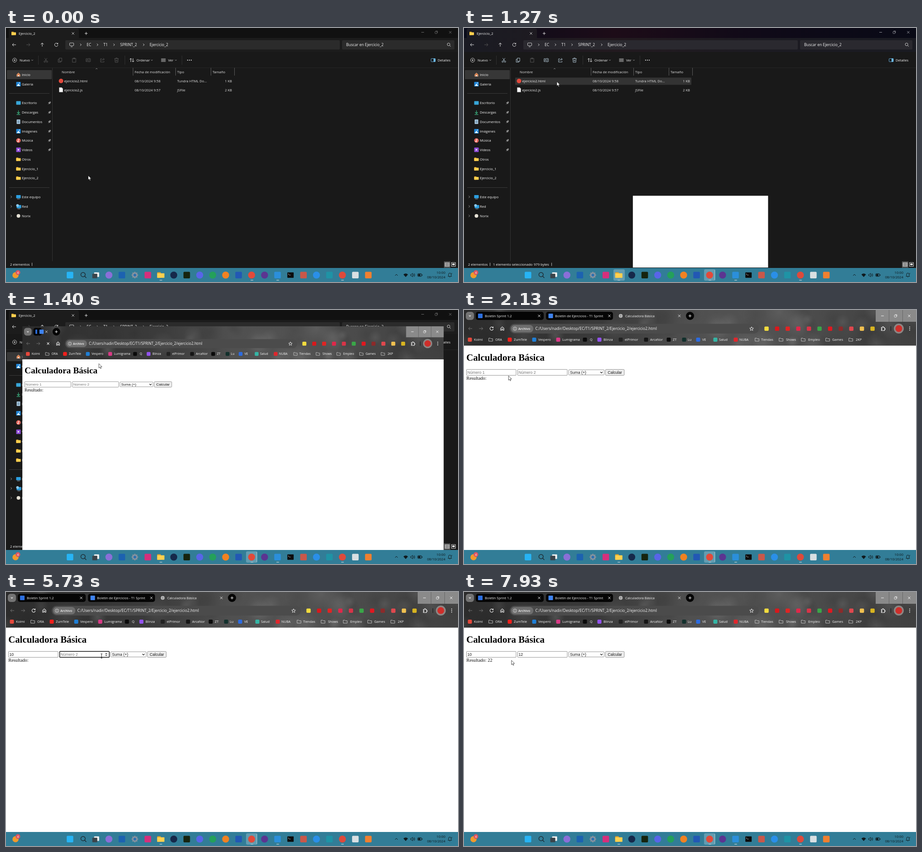
An HTML page with a canvas for the animation above (8 s loop, 998 px wide and 561 px high).

```html
<!DOCTYPE html>
<html lang="es">
<head>
<meta charset="utf-8">
<title>Calculadora Básica</title>
<style>
html, body { margin: 0; width: 100%; height: 100%; overflow: hidden; background: #191919; }
canvas { display: block; width: 998px; height: 561px; }
</style>
</head>
<body>
<canvas id="stage" width="998" height="561"></canvas>
<script>
const g = document.getElementById('stage').getContext('2d');
const UI = '"Open Sans", "Noto Sans", sans-serif';
const ARIAL = '"Liberation Sans", Arial, sans-serif';
const TIMES = '"Liberation Serif", Times, serif';
const WHITE = '#f6f6f6';

// ---- drawing helpers; y is the middle of the capitals ----
function text(s, x, y, size = 7.55, color = WHITE, font = UI, align = 'left', weight = '') {
  g.font = `${weight} ${size}px ${font}`;
  g.textAlign = align;
  g.fillStyle = color;
  g.fillText(s, x, y + size * .36);
}
function box(x, y, w, h, color, r = 0) {
  g.fillStyle = color;
  g.beginPath();
  g.roundRect(x, y, w, h, r);
  g.fill();
}
function frame(x, y, w, h, color, lw = .8, r = 0) {
  g.strokeStyle = color;
  g.lineWidth = lw;
  g.beginPath();
  g.roundRect(x, y, w, h, r);
  g.stroke();
}
function dot(x, y, r, color) { box(x - r, y - r, 2 * r, 2 * r, color, r); }
function square(x, y, s, color, r = 1) { box(x - s / 2, y - s / 2, s, s, color, r); }
function line(d, x, y, color = WHITE, lw = .9, fill) {
  g.save();
  g.translate(x, y);
  const p = new Path2D(d);
  if (fill) { g.fillStyle = fill; g.fill(p); }
  if (lw) { g.strokeStyle = color; g.lineWidth = lw; g.stroke(p); }
  g.restore();
}
function blend(gradient, colors) {
  colors.forEach((c, i) => gradient.addColorStop(i / (colors.length - 1), c));
  return gradient;
}
const across = (...colors) => blend(g.createLinearGradient(0, 0, 998, 0), colors);
const lerp = (a, b, k) => a + (b - a) * k;

const D = {
  x: 'M-2.6 -2.6L2.6 2.6M2.6 -2.6L-2.6 2.6',
  plus: 'M-3.2 0H3.2M0 -3.2V3.2',
  left: 'M4 0H-4M-.8 -3.3L-4 0L-.8 3.3',
  right: 'M-4 0H4M.8 -3.3L4 0L.8 3.3',
  up: 'M0 4V-4M-3.3 -.8L0 -4L3.3 -.8',
  reload: 'M3 -2.2A3.7 3.7 0 1 0 3.7 .6M3.5 -4.2V-1.7H1',
  gt: 'M-1.2 -2.4L1.2 0L-1.2 2.4',
  down: 'M-2 -1L0 1L2 -1',
  home: 'M-3.6 -.4L0 -3.8L3.6 -.4V3.8H1.2V1H-1.2V3.8H-3.6Z',
  lens: 'M2.2 -.8A3 3 0 1 0 -3.8 -.8A3 3 0 1 0 2.2 -.8M1.4 1.4L4 4',
  folder: 'M-4.3 3.3V-3.3H-1L.2 -2H4.3V3.3Z',
  cut: 'M-2.5 -4.5L1.6 2M2.5 -4.5L-1.6 2M-1 3.3A1.6 1.6 0 1 0 -4.2 3.3A1.6 1.6 0 1 0 -1 3.3M4.2 3.3A1.6 1.6 0 1 0 1 3.3A1.6 1.6 0 1 0 4.2 3.3',
  copy: 'M-1.5 -4.5H4V2.5H-1.5ZM-1.5 -2H-4V4.5H2V2.5',
  paste: 'M-3.8 -3.8H3.8V4.6H-3.8ZM-1.5 -4.8H1.5V-2.8H-1.5Z',
  rename: 'M1 -3.2H-4.8V3.2H1M3.2 -3.2H4.8V3.2H3.2M2 -4.8V4.8M-3.4 1.8L-1.8 -1.8L-.2 1.8',
  share: 'M-1 -3H-4V4.2H3.6V2M-2 1.4Q-1 -2 3 -2M1.6 -4.4L4.4 -2L1.6 .4',
  trash: 'M-4.6 -3.4H4.6M-1.4 -3.4V-4.8H1.4V-3.4M-3.6 -3.4L-3 4.8H3L3.6 -3.4M-1 -1V2.6M1 -1V2.6',
  star: 'M0 -4.3L1.2 -1.4L4.3 -1.2L1.9 .8L2.7 3.9L0 2.2L-2.7 3.9L-1.9 .8L-4.3 -1.2L-1.2 -1.4Z',
  puzzle: 'M-4 -2.8H-1.5V-4.2H.8V-2.8H3V-.4H4.4V1.8H3V4.2H-4V1.6H-2.6V-.3H-4Z',
  pin: 'M-3 3L-1 1M-2.4 -.6L.6 2.4L1.2 .4L3 -1.2L1.2 -3L-.4 -1.2Z',
  arrow: 'M0 0V9.6L2.2 7.5L3.7 11L5.3 10.3L3.8 6.9H6.9Z',
  beam: 'M-1.8 -4.8H-.5L0 -4.4L.5 -4.8H1.8M0 -4.4V4.4M-1.8 4.8H-.5L0 4.4L.5 4.8H1.8'
};

function folder(x, y, w = 10) {
  const h = w * .76;
  box(x - w / 2, y - h / 2, w * .5, h, '#e3a226', .8);
  box(x - w / 2, y - h / 2 + h * .18, w, h * .82, '#ffd04f', .8);
}
function winButtons(xs, y, color) {
  line('M-3 0H3', xs[0], y, color);
  frame(xs[1] - 2.8, y - 1.8, 4.6, 4.6, color, .8, 1);
  line('M-1.4 -2.8H2.8V1.4', xs[1], y, color, .8);
  line(D.x, xs[2], y, color);
}
function monitor(x, y) {
  box(x - 5, y - 4, 10, 7, '#2d9fe0', .8);
  box(x - 3, y + 4, 6, 1, '#9ab');
}
function picture(x, y) {
  square(x, y, 10, '#1f86d8');
  line('M-4 4L0 -1L4 4Z', x, y, '', 0, '#eef6ff');
  dot(x + 2, y - 2.4, 1, '#fff');
}

// ---- file manager ----
const places = [
  ['Inicio', 103, (x, y) => { line(D.home, x, y, '#e9b08a', .8, '#d97c4a'); box(x - 1, y + 1, 2, 3, '#fff'); }],
  ['Galería', 124, picture],
  ['Escritorio', 165.5, (x, y) => box(x - 5, y - 4, 10, 8, '#38a6d8', 1)],
  ['Descargas', 186.5, (x, y) => line('M0 -4.5V2.5M-3 -.5L0 2.5L3 -.5M-4 4.6H4', x, y, '#3fc08a', 1.1)],
  ['Documentos', 207, (x, y) => { box(x - 4, y - 5, 8, 10, '#a9c6dc', 1); line('M-2 -2H2M-2 0H2M-2 2H2', x, y, '#48708f'); }],
  ['Imágenes', 228, picture],
  ['Música', 248.5, (x, y) => { dot(x, y, 5, '#e8685e'); line('M0 2V-3L2 -2', x, y, '#fff'); dot(x - 1, y + 2, 1.2, '#fff'); }],
  ['Vídeos', 269, (x, y) => { square(x, y, 10, '#8b4bd2'); line('M-1.5 -2.2L2.2 0L-1.5 2.2Z', x, y, '', 0, '#fff'); }],
  ['Otros', 290, folder], ['Ejercicio_1', 311, folder], ['Ejercicio_2', 331.5, folder],
  ['Este equipo', 373, monitor],
  ['Red', 394, (x, y) => { monitor(x + 1, y + 1); dot(x - 2, y - 2, 3, '#8cc8ea'); }],
  ['Norix', 415, (x, y) => dot(x, y, 4, '#e6e2d6')]
];

function explorer(active, selected, hover) {
  const dim = '#5a5a5a', sep = '#3a3a3a', cell = '#e2e2e2';
  const bar = active ? across('#1a1b23', '#221a1f', '#1c1b22', '#1a1b22') : '#1c1c1c';
  box(0, 0, 998, 530, '#191919');
  box(0, 0, 998, 24, active ? across('#090c1a', '#1d0c18', '#0f0a18', '#090a16') : '#111111');
  box(0, 22, 998, 31, bar);
  box(6, 1, 155, 24, bar, 4);
  folder(17, 12);
  text('Ejercicio_2', 28, 12);
  line(D.x, 148, 12, WHITE, .8);
  line(D.plus, 177, 12);
  winButtons([920, 950, 981], 9.5, active ? '#a5a5ad' : '#777');

  ['left', 'right', 'up', 'reload'].forEach((k, i) =>
    line(D[k], 18 + 31 * i, 37, i == 1 ? dim : WHITE));
  const field = active ? '#2a292f' : '#2b2b2b';
  box(131, 27, 606, 20.5, field, 2);
  box(742, 27, 248, 20.5, field, 2);
  frame(140.5, 33, 9, 6, '#ddd', .9, 1);
  line('M-2 0H2', 145, 41.5, '#ddd');
  [165, 202, 238.5, 304].forEach(x => line(D.gt, x, 37));
  [[178, 'EC'], [215, 'T1'], [252, 'SPRINT_2'], [317, 'Ejercicio_2'], [751, 'Buscar en Ejercicio_2']]
    .forEach(([x, s]) => text(s, x, 37, 8.5));
  line(D.lens, 978, 37, '#ddd', .9);

  frame(14.5, 66.5, 9, 9, WHITE, .8, 4.5);
  line('M-2 0H2M0 -2V2', 19, 71);
  text('Nuevo', 30, 71);
  [58, 322, 375].forEach(x => line(D.down, x, 71, '#aaa', .8));
  [71, 262, 388].forEach(x => box(x, 61, 1, 20, '#303030'));
  ['cut', 'copy', 'paste', 'rename', 'share', 'trash'].forEach((k, i) =>
    line(D[k], 88 + 31.2 * i, 71, selected && k != 'paste' ? '#b9cfdd' : dim, .9));
  line('M-2.5 4V-4M-5 -1.5L-2.5 -4L0 -1.5M2.5 -4V4M0 1.5L2.5 4L5 1.5', 278, 71);
  text('Ordenar', 288, 71);
  line('M-5 -3H5M-5 -1H5M-5 1H5M-5 3H5', 347.5, 71, '#ddd', .8);
  text('Ver', 358, 71);
  [401, 405, 409].forEach(x => dot(x, 71, 1.1, WHITE));
  frame(938.5, 67.5, 9.5, 7, '#6cb8e8', .9, 1);
  box(944, 67.5, 4, 7, '#6cb8e8');
  text('Detalles', 953, 71);
  box(0, 87.5, 998, .8, '#2c2c2c');

  box(102, 88, 1, 427, '#333');
  box(2, 93, 99, 20, '#373737', 1);
  places.forEach(([name, y, icon], i) => {
    icon(27.5, y);
    text(name, 35, y);
    if (i > 1 && i < 8) line(D.pin, 96, y, '#aaa', .8, '#888');
    if (i > 10) line(D.gt, 11.5, y, '#aaa');
  });
  box(7, 144, 89, 1, sep);
  box(7, 352, 89, 1, sep);

  if (hover || selected) box(113, 109.5, 389, 16, '#333333', 1);
  [[123, 'Nombre'], [284, 'Fecha de modificación'], [378, 'Tipo'], [456, 'Tamaño']]
    .forEach(([x, s]) => text(s, x, 97, 7.55, cell));
  [280, 374, 452, 504].forEach(x => box(x, 88, .9, 17, '#666'));
  line('M-2 1L0 -1L2 1', 200, 90, '#aaa', .8);
  dot(121.5, 117, 5, '#e2493c');
  line('M-4 -5H1.5L4 -2.5V5H-4Z', 121.5, 136.5, '#bbb', .5, '#f4f4f4');
  [['ejercicio2.html', '08/10/2024 9:58', 'Tundra HTML Do...', '1 KB'],
   ['ejercicio2.js', '08/10/2024 9:57', 'JSFile', '2 KB']].forEach((row, i) => {
    const y = 117.7 + 19.4 * i;
    text(row[0], 128.5, y);
    text(row[1], 284, y, 7.55, cell);
    text(row[2], 378, y, 7.55, cell);
    text(row[3], 499, y, 7.55, cell, UI, 'right');
  });

  text('2 elementos', 9, 522.5);
  box(57, 518.5, .9, 7, '#ccc');
  if (selected) {
    text('1 elemento seleccionado', 64, 522.5);
    text('979 bytes', 154, 522.5);
    box(193, 518.5, .9, 7, '#ccc');
  }
  box(967, 515.5, 14, 14, '#555');
  frame(969.5, 518.5, 9, 8, '#eee', .8);
  line('M-4 -2H4M-4 0H4M-4 2H4', 974, 522.5, '#eee', .8);
  frame(983.5, 518, 9, 8.5, '#eee', .9);
  box(985.5, 520, 5, 4, '#fff');
}

// ---- browser; icon colour null means a folder ----
const bookmarks = [
  [13, 22, 'Kolmi', '#e4483c'], [59, 69, 'ORA', null], [101, 110, 'ZumTele', '#f0201c'],
  [155, 164, 'Vespero', '#1f7fd6'], [208, 217, 'Lumigrama', '#d93a86'], [267, 278, 'Q', '#0a0a0a'],
  [299, 308, 'Blinza', '#9353f0'], [346, 355, 'elPrimor', '#222'], [402, 411, 'ArcaNor', '#151515'],
  [452, 461, 'ZT', '#0a0a0a'], [486, 494, 'Lu', '#12302c'], [517, 526, 'VE', '#2c6be0'],
  [555, 563, 'Salud', '#35b5a5'], [600, 608, 'NUBA', '#e0262c'], [647, 656, 'Tiendas', null],
  [700, 711, 'Shows', null], [749, 760, 'Empleo', null], [803, 813, 'Games', null], [854, 865, '2KP', null]
];
const extensions = ['#f3dc3e', '#d8181c', '#e02424', '#e0284a', '#d83448', '#3aa648',
  '#e01820', '#8c2a2a', '#e0484e', '#f0c050', '#d8b420'];

function tab(x, right, title, icon, closeX, k, active) {
  if (!active) box(x, 4, Math.max(right - x, 8), 18, '#050505', 5);
  icon();
  if (k > .1) {
    g.save();
    g.beginPath();
    g.rect(x, 2, Math.max(closeX - 8 - x, 0), 22);
    g.clip();
    text(title, x + 20 + (active ? 4 : 0), 13, 7.45);
    g.restore();
  }
  if (k > .3 || active) line(D.x, closeX, 13, WHITE, .9);
}

// Slate-like backdrop: a soft gradient with seeded cloudy patches.
function slate() {
  let seed = 7;
  const rnd = () => (seed = seed * 16807 % 2147483647) / 2147483647;
  g.save();
  g.beginPath();
  g.rect(0, 0, 998, 78.5);
  g.clip();
  box(0, 0, 998, 79, across('#2c2c2c', '#343434', '#3c3c3c', '#505050', '#525252', '#484848', '#404040'));
  for (let i = 0; i < 60; i++) {
    const x = rnd() * 998, y = rnd() * 79, r = 12 + rnd() * 30;
    const tone = rnd() < .5 ? '255,255,255' : '0,0,0';
    const glow = g.createRadialGradient(x, y, 0, x, y, r);
    box(x - r, y - r, 2 * r, 2 * r, blend(glow, [`rgba(${tone},.07)`, `rgba(${tone},0)`]));
  }
  g.restore();
}

function toolbar(k) {
  slate();
  box(4, 4, 18, 18, '#747474', 6);
  line(D.down, 13, 13, WHITE, 1.1);
  tab(26, lerp(40, 176, k), 'Boletín Sprint 1.2', () => square(36, 13, 10, '#2c6fe0'), lerp(40, 166, k), k);
  const x2 = lerp(35, 181, k);
  tab(x2, lerp(46, 329, k), 'Boletín de Ejercicios - T1 Sprint', () => square(x2 + 10.5, 13, 10, '#3f83f0'), lerp(46, 321, k), k);
  const x3 = lerp(45, 332, k);
  tab(x3, 0, 'Calculadora Básica', () => {
    if (k > .1) { dot(x3 + 14, 13, 4.3, '#c8c8c8'); line('M-4 0H4M0 -4V4', x3 + 14, 13, '#666', .8); }
  }, lerp(57, 475.5, k), k, true);
  const px = lerp(80.5, 499, k);
  dot(px, 13, 9, '#050505');
  line(D.plus, px, 13, WHITE, 1.1);
  box(909, 0, 89, 26, '#8a8a8a');
  box(938, 0, .8, 26, '#5c5c5c');
  box(968, 0, .8, 26, '#5c5c5c');
  winButtons([924, 953, 983], 13, '#fff');

  line(D.left, 14, 41, '#7d7d7d');
  line(D.right, 37.5, 41, '#7d7d7d');
  line(k < .5 ? D.x : D.reload, 61, 41, WHITE, 1.1);
  line(D.home, 84.5, 41, WHITE, 1.1);
  box(101, 30.5, 550, 21.5, '#4b4b4b', 10.7);
  box(104, 33, 49, 16.5, '#6e6e6e', 8);
  frame(108.7, 37.5, 7.6, 7.6, WHITE, .8, 3.8);
  line('M0 -.5V2M0 -2.2V-1.2', 112.5, 41.3, WHITE, .9);
  text('Archivo', 120, 41.3, 7.2, WHITE, UI, 'left', '600');
  text('C:/Users/nadir/Desktop/EC/T1/SPRINT_2/Ejercicio_2/ejercicio2.html', 157.5, 41.3, 8.65);
  line(D.star, 635, 41.3);
  extensions.forEach((c, i) => square(668 + 23.4 * i, 41.3, 9.5, c, 2));
  line(D.puzzle, 925.5, 41.3, WHITE, 1.1);
  box(942, 36, 1, 10, '#111');
  dot(960, 41, 11, '#8d8583');
  dot(960, 41, 7.5, '#cf2e2a');
  [-3.4, 0, 3.4].forEach(d => dot(984, 41 + d, 1, WHITE));

  bookmarks.forEach(([x, tx, name, c]) => {
    if (c) square(x, 65.5, 9, c, 2);
    else line(D.folder, x, 65.5, '#ccc', .9);
    text(name, tx, 65.5, 7.35);
  });
}

function numberField(x, hint, value, focused, caretOn, m) {
  const inside = m.x > x && m.x < x + 110 && m.y > 131 && m.y < 144.5;
  frame(x + .5, 131.3, 109.5, 13, focused ? '#101010' : '#767676', focused ? 1.5 : .8, 1);
  text(value || hint, x + 2.5, 137.7, 8.67, value ? '#111' : '#767676', ARIAL);
  if (focused && caretOn) box(x + 2.6 + value.length * 4.82, 133, .7, 9.5, '#000');
  if (inside || focused) {
    if (inside && m.x > x + 98) box(x + 99, 132.7, 9, 10.3, '#d4d4d4');
    line('M-2.6 -1L0 -3.4L2.6 -1ZM-2.6 1L0 3.4L2.6 1Z', x + 103.3, 137.9, '', 0, '#444');
  }
  return inside && m.x < x + 98;
}

function page(t, m) {
  box(0, 78.5, 998, 452, '#fff');
  text('Calculadora Básica', 5.2, 104.7, 20.8, '#000', TIMES, 'left', 'bold');
  const focus = t < 2670 ? 0 : t < 5200 ? 1 : t < 7000 ? 2 : 0;
  const last = [2670, 3530, 4070, 5200, 5800, 6130].filter(e => e <= t).pop();
  const caretOn = Math.floor((t - last) / 530) % 2 == 0;
  const a = t < 3530 ? '' : t < 4070 ? '1' : '10';
  const b = t < 5800 ? '' : t < 6130 ? '1' : '12';
  const over1 = numberField(5, 'Número 1', a, focus == 1, caretOn, m);
  const over2 = numberField(118, 'Número 2', b, focus == 2, caretOn, m);
  frame(231.2, 132, 78.3, 11.5, '#767676', .8, 1);
  text('Suma (+)', 234, 137.7, 8.67, '#111', ARIAL);
  line('M-2.6 -1.3L0 1.3L2.6 -1.3', 303.5, 137.9, '#111', 1.2);
  const pressable = m.x > 312 && m.x < 354 && m.y > 131 && m.y < 145;
  box(312.4, 131.3, 41.4, 13, pressable ? '#e5e5e5' : '#efefef', 1.5);
  frame(312.4, 131.3, 41.4, 13, '#767676', .8, 1.5);
  text('Calcular', 333.1, 137.7, 8.67, '#111', ARIAL, 'center');
  text('Resultado:' + (t < 7000 ? '' : ' 22'), 5.2, 150.6, 10.4, '#111', TIMES);
  return over1 || over2;
}

// ---- taskbar; a colour starting with "o" makes a circle ----
const apps = ['#27b4f5', search, taskView, 'o#8a6fd8', '#1c62b0', gear, '#d5307c', (x, y) => folder(x, y, 16),
  'o#16294a', '#16240f', 'o#5865e8', 'o#24a05a', 'o#f08222', '#2258b4', 'o#e24a3a', 'o#5b3591',
  '#2b8fdb', terminal, '#c9584a', 'o#2a8fe8', '#1f93a5', 'o#dd4a3c', '#d8dfe2', '#f08030'];
function search(x, y) { line('M4 -1A4.8 4.8 0 1 0 -5.6 -1A4.8 4.8 0 1 0 4 -1M2.8 2.6L6.4 6.4', x + 1, y, '#1d2b33', 1.5); }
function taskView(x, y) { box(x - 4, y - 6, 11, 10, '#f2f2f2', 1); box(x - 8, y - 3, 11, 10, '#3a444a', 1); }
function gear(x, y) {
  for (let i = 0; i < 8; i++) {
    const a = i * Math.PI / 4;
    dot(x + 6 * Math.cos(a), y + 6 * Math.sin(a), 1.6, '#7d8b98');
  }
  dot(x, y, 6, '#8593a0');
  dot(x, y, 3, '#2c70b0');
}
function terminal(x, y) {
  box(x - 7, y - 6, 14, 12, '#0c0c0c', 1);
  line('M-5 -3L-3.5 -1.8L-5 -.6M-2.6 0H0', x, y, '#ddd', .8);
}

function taskbar(t) {
  box(0, 530, 998, 31, '#327d97');
  const lit = x => box(x - 12.5, 533, 25, 25, 'rgba(255,255,255,.24)', 3);
  if (t >= 930 && t < 1330) lit(342.5);
  if (t >= 1130) {
    lit(542.5);
    line('M0 -11V11', 553.5, 545.5, 'rgba(255,255,255,.45)', .8);
  }
  apps.forEach((a, i) => {
    const x = 141.3 + 28.64 * i, y = 545.7;
    if (typeof a == 'function') a(x, y);
    else if (a[0] == 'o') dot(x, y, 7.7, a.slice(1));
    else square(x, y, 14.5, a, 2);
  });
  [342, 543, 600, 743].forEach(x => box(x - 3, 556.3, 6, 1.4, '#a9c4cf', .7));
  dot(21, 546, 6.8, '#f09a2c');
  dot(26.3, 540, 5.2, '#dc5560');
  text('4', 26.3, 540, 7, '#fff', UI, 'center');

  const ink = '#10191d';
  line('M-3 1.5L0 -1.5L3 1.5', 862, 545.5, ink, 1);
  line('M-5 -1.5Q0 -6 5 -1.5L0 4Z', 882.5, 546, '', 0, ink);
  line('M-4.5 -1.5H-3L0 -4V4L-3 1.5H-4.5ZM1.8 -2Q3.2 0 1.8 2M3.4 -3.6Q6 0 3.4 3.6', 898, 545.7, ink, .9);
  frame(909, 542.6, 8.6, 6, ink, 1, 1.5);
  box(910, 543.6, 5, 4, ink);
  box(918.4, 544.2, 1, 3, ink);
  text('10:00', 970, 540.3, 7.6, ink, UI, 'right');
  text('08/10/2024', 970, 550.3, 7.6, ink, UI, 'right');
  line('M-4 3H4L2.8 1V-1.5A2.8 2.8 0 0 0 -2.8 -1.5V1ZM-1 4.4H1', 980, 545.5, ink, .9);
  text('z', 983, 542.5, 5, ink);
}

// ---- pointer: time, x, y ----
const path = [
  [0, 181.5, 326], [70, 181.5, 326], [330, 190, 250], [730, 205, 118.5], [1500, 205, 118.5], [1800, 186, 140],
  [2130, 98.3, 145.5], [2450, 100, 138.5], [3500, 100, 138.5], [3590, 110.3, 137.5], [4560, 110.3, 137.5],
  [4850, 150, 148.5], [5190, 211, 141.3], [6100, 211, 141.3], [6450, 280, 126], [6800, 333, 135],
  [7180, 333, 135], [7200, 331, 134], [7620, 331, 134], [7760, 230, 166], [7930, 104.8, 151], [8001, 104.8, 151]
];
function pointer(t) {
  const i = path.findIndex(p => p[0] > t);
  const a = path[i - 1], b = path[i];
  const k = (t - a[0]) / (b[0] - a[0]);
  return { x: lerp(a[1], b[1], k), y: lerp(a[2], b[2], k) };
}

function draw(t) {
  const m = pointer(t);
  let overText = false;
  // The window grows out of its taskbar button.
  const s = t < 1252 ? 0 : t > 1600 ? 1 : 1 - Math.exp((1250.2 - t) / 55.7);
  if (s < 1) explorer(t >= 930 && t < 1330, t >= 930, m.y > 109 && m.y < 126);
  if (s > 0) {
    g.save();
    g.translate(532 * (1 - s), 528.5 * (1 - s));
    g.scale(s, s);
    if (t < 1320) box(0, 0, 998, 530, '#fff');
    else {
      overText = page(t, t > 1600 ? m : { x: 0, y: 0 });
      const k = Math.min(1, Math.max(0, (t - 1410) / 290));
      toolbar(k * (2 - k));
    }
    g.restore();
  }
  taskbar(t);
  if (overText) line(D.beam, m.x, m.y, '#000', .9);
  else line(D.arrow, m.x, m.y, '#111', .7, '#fff');
}

const start = performance.now();
function tick() {
  const step = Math.floor((performance.now() - start + 4) * .015) % 120;
  draw(Math.round(step / .15) * 10 / 10 / 10 * 10 === 0 ? 0 : Math.round(step / .15) * 10);
  requestAnimationFrame(tick);
}
tick();
</script>
</body>
</html>
```
